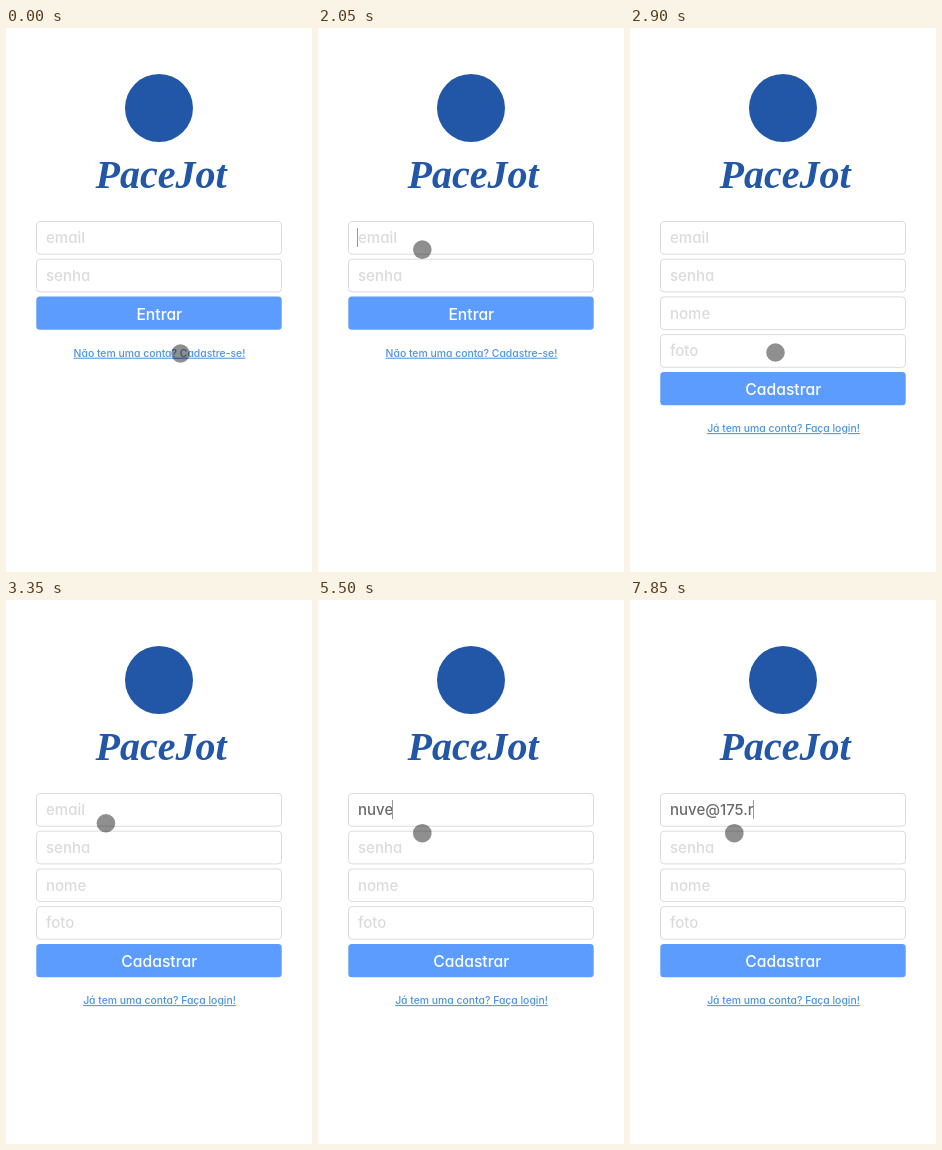
Recreate the animation shown at these times as an HTML page. Size 306 by 544 pixels, loop 8000 ms.

```html
<!DOCTYPE html>
<html lang="pt-BR">
<head>
<meta charset="utf-8">
<title>Login</title>
<style>
  html, body { margin: 0; width: 100%; height: 100%; overflow: hidden; background: #fff; }
  svg { display: block; width: 100vw; height: 100vh; }
  text { font: 500 15px Inter, "Open Sans", sans-serif; font-feature-settings: "cv11"; }
  .box { fill: #fff; stroke: #dcdcdc; }
  .hint { fill: #dbdbdb; }
  .typed { fill: #6a6a6a; }
  .button { fill: #5c9cfe; }
  .label { fill: #fff; font-size: 15.7px; text-anchor: middle; }
  .link { fill: #4a94e4; font-size: 10.4px; text-anchor: middle; text-decoration: underline; }
  .brand { fill: #2257a8; font: italic bold 40px "Liberation Serif", serif; text-anchor: middle; }
</style>
</head>
<body>
<svg viewBox="0 0 306 544">
  <circle cx="153" cy="80" r="34" fill="#2257a8"/>
  <text class="brand" x="155" y="160">PaceJot</text>
  <g id="login"></g>
  <g id="signup"></g>
  <text id="typed" class="typed" x="40" y="215.2"></text>
  <rect id="caret" y="200" width="1" height="19" fill="#999"/>
  <circle id="pointer" r="9.3" fill-opacity=".44"/>
</svg>
<script>
const LOOP = 8000;
const ROW = 37.7;
const PAGE_CHANGE = 2900;
const $ = id => document.getElementById(id);

function buildForm(id, hints, button, link) {
  const rows = hints.map((hint, i) => {
    const y = 193.5 + i * ROW;
    const hintId = i ? "" : `id="${id}Hint"`;
    return `<rect class="box" x="30.5" y="${y}" width="245" height="32.7" rx="3.5"/>
      <text ${hintId} class="hint" x="40" y="${y + 21.7}">${hint}</text>`;
  });
  const y = 193 + hints.length * ROW;
  $(id).innerHTML = rows.join("") +
    `<rect class="button" x="30.3" y="${y + .2}" width="245.4" height="33.2" rx="3.5"/>
    <text class="label" x="153.3" y="${y + 23.2}">${button}</text>
    <text class="link" x="153.5" y="${y + 60.3}">${link}</text>`;
}

buildForm("login", ["email", "senha"], "Entrar", "Não tem uma conta? Cadastre-se!");
buildForm("signup", ["email", "senha", "nome", "foto"], "Cadastrar", "Já tem uma conta? Faça login!");

const moves = [
  { start: 0, end: 0, x: 174.5, y: 325.5 },
  { start: 600, end: 800, x: 115.5, y: 239.5 },
  { start: 950, end: 1100, x: 98.5, y: 210 },
  { start: 2050, end: 2450, x: 154.5, y: 321.5 },
  { start: 2700, end: 2700, x: 145.5, y: 324.5 },
  { start: 3150, end: 3450, x: 91.5, y: 204.5 },
  { start: 3750, end: 4000, x: 104.3, y: 233.2 }
];

const bursts = [
  { text: "nuve", start: 4400, end: 5500 },
  { text: "@175.r", start: 6400, end: 7850 }
];

const smooth = p => p * p * (3 - 2 * p);

// Eased travel, shown in hard steps of roughly 100 ms; the first step falls on the start.
function pointerAt(t) {
  const index = moves.findLastIndex(move => move.start <= t);
  const to = moves[index];
  const from = moves[Math.max(0, index - 1)];
  const duration = to.end - to.start;
  const intervals = Math.round(duration / 100);
  const step = duration ? Math.floor((t - to.start) / duration * intervals + 1e-6) : 0;
  const p = smooth(Math.min(1, (step + 1) / (intervals + 1)));
  return { x: from.x + (to.x - from.x) * p, y: from.y + (to.y - from.y) * p };
}

// Each burst types its first letter at the start and its last one at the end.
function typedAt(t) {
  return bursts.map(({ text, start, end }) => {
    const p = (t - start) / (end - start);
    const count = Math.floor(p * (text.length - 1) + 1e-6) + 1;
    return text.slice(0, Math.max(0, count));
  }).join("");
}

function show(id, visible) {
  $(id).style.display = visible ? "" : "none";
}

function render(t) {
  const signup = t >= PAGE_CHANGE;
  const text = typedAt(t);
  const pointer = pointerAt(t);

  show("login", !signup);
  show("signup", signup);
  show("signupHint", !text);
  show("caret", t >= (signup ? 3750 : 1650));

  $("typed").textContent = text;
  $("caret").setAttribute("x", 39 + Math.round($("typed").getComputedTextLength()));
  $("pointer").setAttribute("cx", pointer.x);
  $("pointer").setAttribute("cy", pointer.y);
}

const start = performance.now();
function frame() {
  render((performance.now() - start) % LOOP);
  requestAnimationFrame(frame);
}
frame();
</script>
</body>
</html>
```
